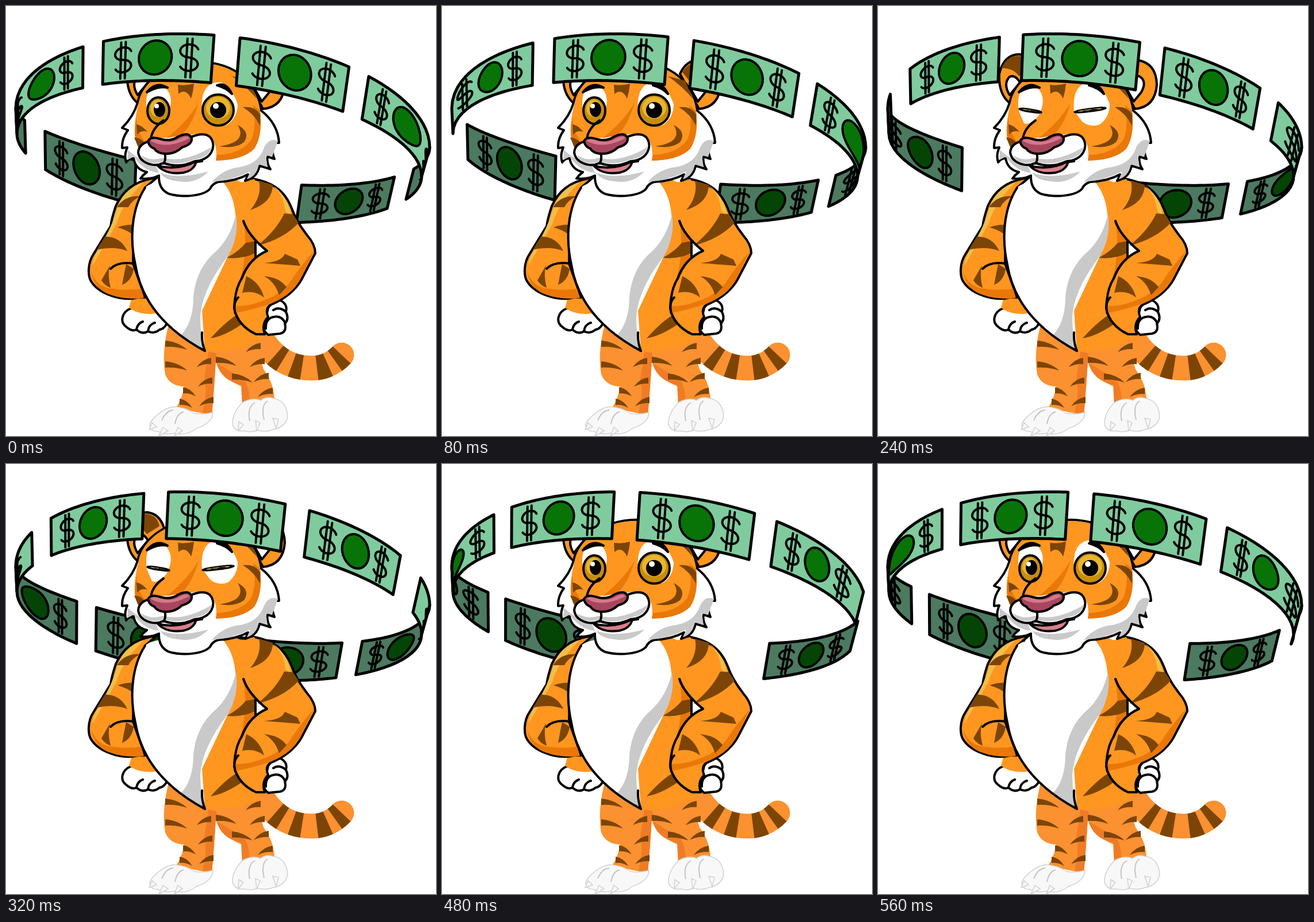
Write an HTML page with a canvas that moves like this. It is 748 px wide and 748 px high and loops after 640 ms.

```html
<!DOCTYPE html>
<html lang="en">
<head>
<meta charset="utf-8">
<title>Tiger with circling money</title>
<style>
  html, body { margin: 0; width: 100%; height: 100%; overflow: hidden; background: #fff; }
  canvas, svg { position: absolute; left: 0; top: 0; width: 100vw; height: 100vh; }
  .ink { stroke: #000; stroke-width: 4; stroke-linejoin: round; stroke-linecap: round; }
  .line { fill: none; }
  .fur { fill: #ff9620; }
  .shade { fill: #e97809; }
  .leg { fill: #fb9130; }
  .stripe { fill: #7c4505; }
  .white { fill: #fff; }
  .grey { fill: #c9c9c9; }
  .glow { fill: #eec04a; }
  .paw { fill: #f8f8f8; stroke: #d2d2d2; stroke-width: 1.5; }
  .eye * { vector-effect: non-scaling-stroke; }
</style>
</head>
<body>
<canvas id="back" width="748" height="748"></canvas>

<svg viewBox="0 0 748 748">
  <defs><path id="tail" d="M450 586Q480 630 532 630Q562 630 584 607"/></defs>

  <!-- tail -->
  <g fill="none" stroke-width="43">
    <use href="#tail" stroke="#fb9130" stroke-linecap="round"/>
    <use href="#tail" stroke="#7c4505" stroke-dasharray="0 28 16 18 18 26 20 14 16 99"/>
  </g>

  <!-- legs -->
  <path class="leg" d="M284 550Q270 603 277 641Q285 661 310 662Q307 681 296 699L358 712Q361 681 363 651L366 598L345 596Z"/>
  <path class="leg" d="M360 560L365 612Q366 643 410 662Q414 677 411 694L467 690Q468 659 448 632Q438 607 452 565Z"/>
  <path fill="#ef7c25" d="M352 601L366 604L358 712L342 707Q351 670 345 649ZM366 621Q374 651 409 659L411 697L423 694Q425 666 414 650Z"/>
  <g id="legStripes" class="stripe"></g>
  <path class="paw" d="M292 697C275 698 253 718 250 728Q250 740 264 740Q280 747 294 743Q315 748 331 735Q360 725 360 707Q344 711 328 709Q313 698 292 697Z"/>
  <path class="paw" d="M411 690Q393 709 394 728Q399 742 415 739Q426 743 437 738Q452 742 464 737Q486 733 490 714Q488 685 463 682Q452 679 443 686Q428 680 411 690Z"/>
  <path class="line" stroke="#c4c4c4" stroke-width="2" d="M271 721Q278 704 291 703M294 727Q297 709 309 706M424 722Q419 698 433 690M449 720Q443 694 455 687"/>
  <path class="paw" d="M254 725L249 737L262 732ZM273 733L266 748L282 739ZM299 733L293 748L307 739ZM405 723L404 739L413 728ZM434 721L436 740L442 725ZM464 717L470 735L474 719Z"/>

  <!-- torso -->
  <path class="fur" d="M250 310L395 300L460 330L434 410V470L447 574Q412 604 346 600Q222 530 221 390Z"/>
  <path class="shade" d="M413 375L433 408V445L399 510Q424 430 413 375Z"/>
  <path class="stripe" d="M384 438Q405 427 417 412L433 409V430Q411 441 384 438ZM356 578Q387 543 413 531L411 553Q381 574 356 578Z"/>

  <!-- left arm -->
  <path class="white ink" d="M217 526C202 532 197 549 209 558Q219 567 227 563Q237 572 247 566Q258 571 267 563Q276 562 282 548L265 525Z"/>
  <path class="line ink" stroke-width="3" d="M227 562Q229 552 238 549M247 566Q248 554 259 551"/>
  <path class="fur" d="M222 495L214 525Q234 540 268 534L230 480Z"/>
  <path class="fur ink" d="M262 299C219 304 201 326 191 348Q184 369 182 383L152 432C142 447 142 469 148 479Q160 498 190 506Q212 512 229 507L242 507L221 448L222 370L242 316Z"/>
  <path class="shade" d="M148 462Q158 491 188 492Q210 495 235 492L240 508Q207 512 178 501Q153 491 148 462Z"/>
  <path class="glow" d="M240 306Q205 319 195 348Q185 384 161 423Q152 436 150 452Q175 410 192 379Q203 341 240 306Z"/>
  <path class="stripe" d="M193 350Q207 329 233 331Q217 340 213 350ZM194 385Q210 379 224 381L221 398Q211 390 194 385ZM172 401Q199 401 211 426Q187 417 158 424ZM181 451Q176 468 182 490Q171 486 166 477ZM222 457Q219 478 202 485Q206 463 209 449Z"/>
  <path class="line ink" d="M182 457Q195 444 222 448"/>

  <!-- belly -->
  <path class="white" d="M241 316Q265 296 375 304C399 327 406 374 394 418L341 530L346 600Q227 544 221 408Q217 356 241 316Z"/>
  <path class="grey" d="M400 362Q406 400 386 435Q340 495 338 542Q338 572 346 600Q323 588 305 572Q326 549 326 505Q331 456 364 428Q391 403 400 362Z"/>
  <path class="line ink" d="M242 316C218 353 215 405 225 450C235 511 273 561 346 600Q340 585 341 568"/>

  <!-- right arm -->
  <path class="white" d="M434 405L454 426L434 445Z"/>
  <path class="line ink" d="M434 408V442"/>
  <path class="white ink" d="M456 525Q471 506 482 515Q490 522 487 532Q493 545 485 552Q489 568 476 570L456 572Q443 562 451 548Z"/>
  <path class="line ink" stroke-width="3" d="M487 532Q475 522 465 529M486 552Q479 537 465 541Q451 544 452 561"/>
  <path class="fur ink" d="M413 374Q421 399 454 426Q423 439 410 474Q398 493 397 526Q403 556 435 571L450 571Q444 553 456 541Q450 527 460 520Q498 504 514 476L538 430Q538 415 524 399Q505 375 497 352C485 321 464 305 420 299"/>
  <path class="fur" d="M411 374L388 312L432 301L452 340Z"/>
  <path class="shade" d="M536 426Q510 455 493 482Q474 505 443 514Q424 522 399 522L400 534Q430 528 460 518Q498 503 512 475Z"/>
  <path class="glow" d="M461 310Q489 328 496 364L486 357Q483 326 461 310Z"/>
  <path class="stripe" d="M440 304L464 311Q464 342 425 355Q446 330 440 304ZM437 417Q469 392 484 361L499 362L509 377Q484 405 437 417ZM449 447Q480 445 485 431L507 441L512 452ZM449 470Q476 472 488 489L475 503Q468 480 449 470ZM418 470Q441 480 449 507Q432 494 411 499Z"/>
  <path class="line ink" d="M413 374Q421 399 454 426Q423 439 410 474M404 507Q394 516 399 535"/>

  <!-- ears -->
  <path class="fur ink" d="M228 168Q209 151 211 118Q219 84 246 84Q268 87 275 112Z"/>
  <path class="stripe" d="M215 108Q224 86 246 87Q263 90 267 108L245 122Q236 108 215 108Z"/>
  <path class="white ink" stroke-width="3" d="M229 155Q217 135 229 123Q239 119 247 133Z"/>
  <path class="fur ink" d="M414 118Q426 92 451 94Q484 99 485 137Q482 176 447 179Z"/>
  <path class="stripe" d="M418 115Q430 96 451 97Q443 106 443 123L430 130Z"/>
  <path class="white ink" stroke-width="3" d="M430 140Q440 121 454 122Q469 130 458 150L445 166Z"/>

  <!-- head -->
  <path class="white ink" d="M229 168Q222 192 202 212L212 216Q201 231 202 247L211 246Q205 259 209 272Q215 264 222 265Q225 284 245 289Q238 294 234 300Q252 302 266 295Q265 319 284 327C310 334 344 330 355 318Q359 309 369 306Q399 305 421 293Q419 299 416 304Q437 299 441 278Q452 281 460 284Q453 274 455 262L467 266Q461 252 464 238L475 238Q473 205 444 182C437 133 399 99 337 97C276 98 235 134 229 168Z"/>
  <path class="grey" d="M473 235Q458 228 449 246Q440 274 408 280Q378 283 358 306Q392 304 425 288L419 301Q436 296 440 275L455 280L452 260L463 262ZM212 250Q231 269 260 276L266 290Q240 288 222 262L211 268ZM268 290Q300 302 352 288Q331 310 300 305Q276 303 268 290Z"/>
  <path class="fur" d="M231 168C237 134 277 100 337 99C399 101 436 135 442 182Q447 221 432 248Q413 268 365 269Q371 224 336 222L253 232Q238 235 232 249Q216 225 231 168Z"/>
  <path class="shade" d="M442 182Q447 225 432 248Q413 268 365 269L367 259Q407 258 426 234Q437 211 430 173ZM232 249Q219 229 227 195Q228 219 241 235ZM335 168Q323 210 304 225L279 230Q316 201 335 168Z"/>
  <path class="white" d="M245 183C240 147 253 132 278 143Q294 160 281 188Q268 208 254 204Z"/>
  <path class="white" d="M341 182C338 148 351 130 375 133Q394 144 403 171Q403 193 386 206Q371 212 356 202Z"/>
  <path class="stripe" d="M299 137Q314 139 327 135Q326 148 322 161Q313 142 300 153ZM227 206Q236 207 246 219Q235 215 228 224ZM223 229Q232 228 240 237L231 247ZM403 207Q426 219 414 237Q398 249 371 244Q421 237 403 207ZM412 176Q434 174 442 189L442 208Q431 187 412 176ZM393 122Q415 137 437 162L423 130Z"/>
  <path class="ink" d="M245 150Q261 130 281 142Q264 139 245 150ZM367 138Q383 132 393 153Q383 142 367 138Z"/>

  <g class="eye" data-x="265" data-y="182" data-tilt="9">
    <ellipse class="ink" rx="19" ry="23" fill="#c88d0c"/>
    <ellipse cx="-1" cy="-4" rx="13" ry="15" fill="#e9b52e"/>
    <ellipse cx="2" cy="-2" rx="10" ry="13"/>
    <circle cx="-3" cy="-8" r="4" fill="#fff"/>
  </g>
  <g class="eye" data-x="369" data-y="181" data-tilt="-7">
    <circle class="ink" r="27" fill="#c88d0c"/>
    <ellipse cy="-4" rx="21" ry="19" fill="#e9b52e"/>
    <circle r="14"/>
    <circle cx="-4" cy="-7" r="5" fill="#fff"/>
  </g>

  <!-- muzzle -->
  <path class="line ink" stroke-width="3" d="M252 231Q254 213 274 199"/>
  <path fill="#d97f8b" class="ink" d="M264 278Q298 287 331 270Q328 286 308 290Q279 294 264 278Z"/>
  <path class="white ink" d="M251 235Q231 239 230 255C233 274 258 281 274 273Q301 283 328 270C357 268 368 244 355 228Q344 218 319 229L280 252Z"/>
  <path class="grey" d="M234 259Q251 271 273 264Q311 274 358 245Q353 264 328 267Q299 279 275 270Q244 280 234 259Z"/>
  <path class="line ink" d="M276 256Q279 267 274 274M325 272L341 270"/>
  <path fill="#a84660" class="ink" d="M247 235Q252 226 267 231Q285 237 300 227Q318 218 323 230Q324 241 306 246Q295 257 279 257Q263 257 258 248Q249 245 247 235Z"/>
  <path fill="#d4788a" d="M251 234Q257 229 270 234Q288 240 303 230Q315 224 319 230Q306 237 292 240Q268 245 251 234Z"/>
</svg>

<canvas id="front" width="748" height="748"></canvas>

<script>
const STEP = 80, STEPS = 8, BILLS = 7, HALF = 0.41;
const FOLD = 3.22, HALF_RING = BILLS / 2;
const { PI, sin, cos, tanh, min, max, floor, round } = Math;

// Angle around the ring; it turns faster where the ribbon folds at either side.
function ringAngle(u) {
  const turns = (u - FOLD) / HALF_RING, k = round(turns);
  return PI + PI / 4.5 * (u - FOLD + k + tanh(18 * (turns - k)) / 2);
}

// The ribbon lies between two tilted ellipses; v runs from top to bottom edge.
function ringPoint(u, v) {
  const angle = ringAngle(u), c = cos(angle), s = sin(angle), near = s > 0;
  const topY = 212 - 34 * c - s * (near ? 160 : 86 - 20 * c);
  const bottomY = 259 - 37 * c - s * (near ? 124 : 112);
  return [377 - 360 * c - v * (6 - 8 * c), topY + (bottomY - topY) * v];
}

const range = (n, f) => Array.from({ length: n + 1 }, (_, i) => f(i / n));
const CIRCLE = range(32, k => [0.122 * cos(k * 2 * PI), 0.5 + 0.37 * sin(k * 2 * PI)]);
const BARS = [-0.018, 0.018].map(x => range(4, k => [x, 0.1 + 0.82 * k]));
const S_CURVE = range(30, k => {
  const upper = k < 0.5;
  const angle = upper ? -0.3 - k * 8.4 : -1.5 + (k - 0.5) * 8.4;
  return [0.065 * cos(angle), (upper ? 0.36 : 0.64) + 0.14 * sin(angle)];
});

function drawPart(ctx, from, to, center, light) {
  const facing = light ? 1 : -1;
  const trace = (points, shift = 0) => {
    ctx.beginPath();
    for (const [du, v] of points) {
      const u = center + shift + du * facing;
      ctx.lineTo(...ringPoint(min(to, max(from, u)), v));
    }
  };
  const edge = range(24, k => (from + (to - from) * k - center) * facing);
  const outline = [...edge.map(u => [u, 0]), ...edge.reverse().map(u => [u, 1])];
  const touches = (shift, reach) => center + shift + reach > from && center + shift - reach < to;

  ctx.lineJoin = ctx.lineCap = "round";
  ctx.fillStyle = light ? "#80cb9e" : "#4c7a60";
  trace(outline);
  ctx.closePath();
  ctx.fill();
  ctx.save();
  ctx.clip();
  ctx.lineWidth = 4;
  if (touches(0, 0.12)) {
    trace(CIRCLE);
    ctx.fillStyle = light ? "#087408" : "#044506";
    ctx.fill();
    ctx.stroke();
  }
  for (const shift of [-0.245, 0.245]) {
    if (!touches(shift, 0.05)) continue;
    for (const mark of [...BARS, S_CURVE]) {
      trace(mark, shift);
      ctx.stroke();
    }
  }
  ctx.restore();
  ctx.lineWidth = 5;
  trace(outline);
  ctx.closePath();
  ctx.stroke();
}

const [back, front] = ["back", "front"].map(id => document.getElementById(id).getContext("2d"));
const eyes = document.querySelectorAll(".eye");

function drawBill(center) {
  // Bills stay out of sight while they pass behind the body.
  if (center > 4.55 && center < 5.45) return;
  for (let side = -1; side <= 2; side++) {
    const end = FOLD + side * HALF_RING, light = side % 2 === 0;
    const from = max(center - HALF, end - HALF_RING), to = min(center + HALF, end);
    if (to - from > 0.01) drawPart(light ? front : back, from, to, center, light);
  }
}

function addStripes(count, x, y, dx, dy, length) {
  const group = document.getElementById("legStripes");
  for (let i = 0; i < count; i++) {
    const wedge = document.createElementNS("http://www.w3.org/2000/svg", "path");
    wedge.setAttribute("d", `M${x + i * dx} ${y + i * dy - 6}q${length * 0.6} 2 ${length} 16q${-length / 2} -6 ${-length} -5z`);
    group.append(wedge);
  }
}
addStripes(2, 277, 588, 0, 36, 38);
addStripes(2, 308, 669, -6, 20, 22);
addStripes(3, 357, 618, 2, 34, -25);
addStripes(2, 365, 616, 28, 29, 36);
addStripes(4, 443, 592, 7, 26, -26);

function drawStep(step) {
  for (const ctx of [back, front]) ctx.clearRect(0, 0, 748, 748);
  for (let i = 0; i < BILLS; i++) drawBill(i + step / STEPS);
  const closed = step === 3 || step === 4;
  for (const eye of eyes) {
    const { x, y, tilt } = eye.dataset;
    eye.setAttribute("transform", `translate(${x} ${y})` + (closed ? ` rotate(${tilt}) scale(1 0.07)` : ""));
  }
}

const start = performance.now();
let shown = -1;
function tick(now) {
  const step = floor(max(0, now - start) / STEP) % STEPS;
  if (step !== shown) drawStep(shown = step);
  requestAnimationFrame(tick);
}
tick(start);
</script>
</body>
</html>
```
